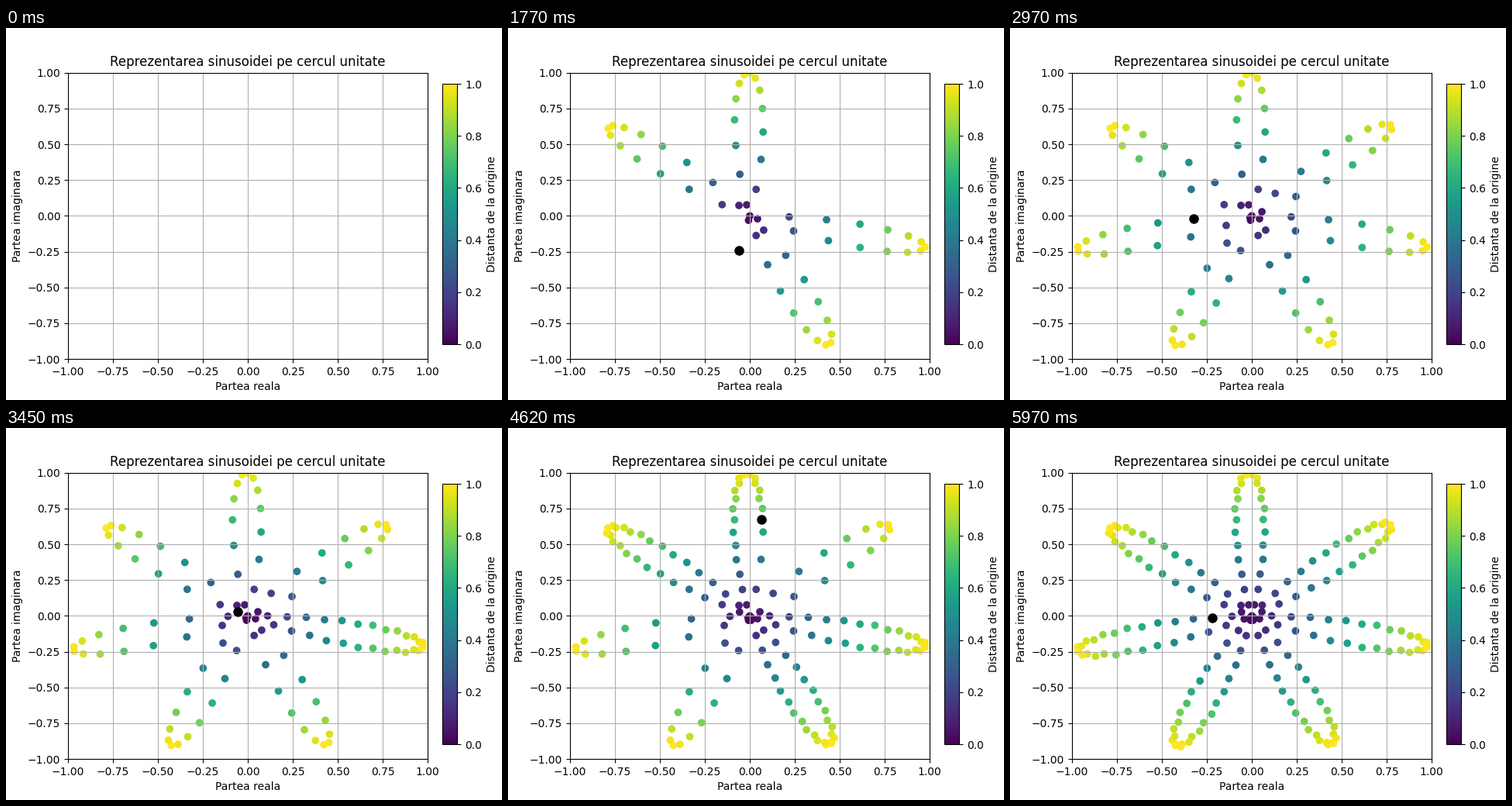
Write a matplotlib script that moves like this. It is 640 px wide and 480 px high and loops after 6000 ms.

```python
import numpy as np
import matplotlib.pyplot as plt
from matplotlib.animation import FuncAnimation

N = 200        # samples, one per frame
FREQ = 7       # cycles of the sine over one turn

k = np.arange(N)
signal = np.sin(2 * np.pi * FREQ * np.linspace(0, 1, N))
z = signal * np.exp(-2j * np.pi * k / N)
points = np.column_stack([z.real, z.imag])
dist = np.abs(z)

fig, ax = plt.subplots(figsize=(6.4, 4.8), dpi=100)
fig.subplots_adjust(left=0.125, right=0.85, bottom=0.11, top=0.88)
ax.set(xlim=(-1, 1), ylim=(-1, 1),
       xlabel="Partea reala", ylabel="Partea imaginara",
       title="Reprezentarea sinusoidei pe cercul unitate")
ax.grid(True)

dots = ax.scatter([], [], c=[], cmap="viridis", vmin=0, vmax=1)
head, = ax.plot([], [], "ko", markersize=8)

cax = fig.add_axes([0.88, 0.15, 0.03, 0.7])
fig.colorbar(dots, cax=cax, label="Distanta de la origine")


def update(n):
    dots.set_offsets(points[:n])
    dots.set_array(dist[:n])
    last = points[max(n - 1, 0):n]
    head.set_data(last[:, 0], last[:, 1])
    return dots, head


anim = FuncAnimation(fig, update, frames=N, interval=30,
                     repeat=True, repeat_delay=0, blit=False)
plt.show()
```
